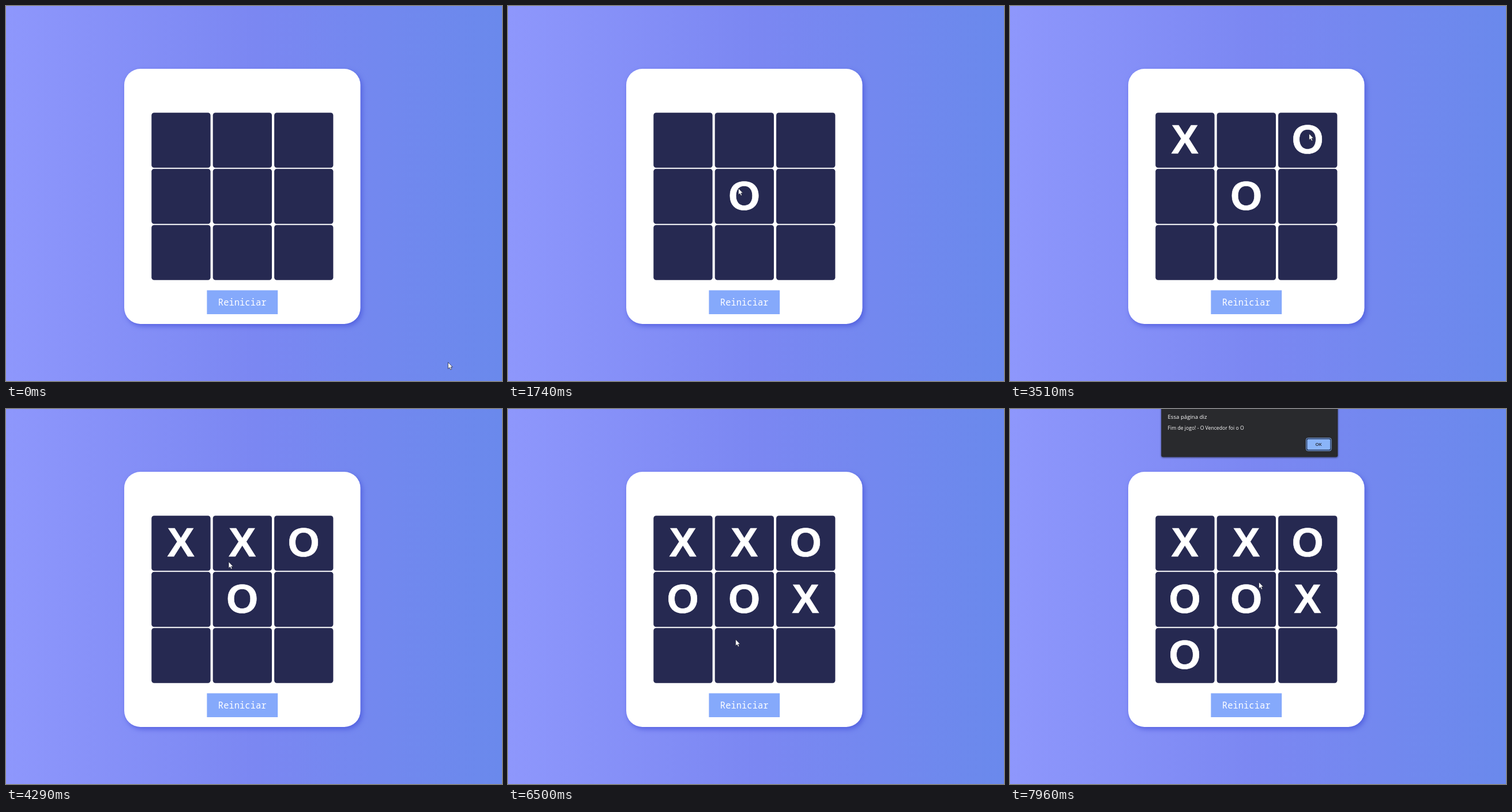
Animation of 860x651 px, one loop 7990 ms. Source, as an HTML page:

```html
<!DOCTYPE html>
<html lang="pt">
<head>
<meta charset="utf-8">
<title>Jogo da velha</title>
<style>
  html, body { margin: 0; width: 100%; height: 100%; overflow: hidden; }
  body { background: linear-gradient(to right, #8e97fc, #7b87f2 50%, #6a89ec); }
  svg { display: block; }
  #card { fill: #fff; filter: drop-shadow(3px 4px 4px #4450d8b0); }
  .cell { fill: #262951; }
  .mark { font: bold 71px "Liberation Sans", Arial, sans-serif; fill: #fff; stroke: #fff; stroke-width: .7; text-anchor: middle; }
  .restart { font: 500 15.5px "Noto Sans Mono", monospace; fill: #fff; text-anchor: middle; }
  #dialog { font-family: "Open Sans", sans-serif; fill: #fff; }
  #dialog .panel { fill: #292a2d; filter: drop-shadow(0 1px 1.5px #0009); }
</style>
</head>
<body>
<svg width="860" height="651" viewBox="0 0 860 651">
  <rect id="card" x="205" y="109" width="409.5" height="443" rx="28"/>
  <g id="board"></g>
  <rect x="348.4" y="493.5" width="122.8" height="41.5" fill="#85a9fb"/>
  <text class="restart" x="409.7" y="520">Reiniciar</text>
  <g id="dialog">
    <rect class="panel" x="262.3" y="-8" width="306" height="91.3" rx="3"/>
    <text x="273.5" y="17" font-size="9.65">Essa página diz</text>
    <text x="273.5" y="36.3" font-size="8.65">Fim de jogo! - O Vencedor foi o O</text>
    <rect x="513.5" y="50.5" width="43.5" height="22" rx="3" fill="#14213d" stroke="#8ab4f8"/>
    <rect x="515.2" y="52.2" width="40.1" height="18.6" rx="2" fill="#8ab4f8"/>
    <text x="535" y="64" font-size="7.8" font-weight="600" text-anchor="middle" fill="#202124">OK</text>
  </g>
  <path id="cursor" d="M.5.6V11.8L3 9.5 4.8 13.3 6.7 12.5 5 8.8H8.4Z" fill="#fff" stroke="#15172b" stroke-width=".7"/>
</svg>
<script>
const LOOP = 7990;
const $ = id => document.getElementById(id);

// Time and cell of each click; the players alternate
const clicks = [[1740, 4], [2610, 0], [3510, 2], [3960, 1], [4770, 3], [5980, 5], [7190, 6]];

// Pointer strokes: departure, arrival, x, y
const strokes = [
  [0, 0, 766, 618],
  [10, 785, 428, 333],
  [835, 990, 399, 316],
  [1980, 2500, 308, 214],
  [2660, 2980, 518, 221],
  [3520, 3880, 414, 230],
  [4080, 4600, 335, 326],
  [5050, 5180, 398, 313],
  [5180, 5810, 503, 355],
  [5980, 6890, 324, 428],
  [7790, 7960, 431, 300]
];

const clamp = u => Math.max(0, Math.min(1, u));
const ease = u => u * u * (3 - 2 * u);
const progress = (t, from, to) => clamp((t - from) / (to - from || 1));

function add(tag, attrs, text = "") {
  const el = document.createElementNS("http://www.w3.org/2000/svg", tag);
  for (const name in attrs) el.setAttribute(name, attrs[name]);
  el.textContent = text;
  return $("board").appendChild(el);
}

const column = i => i % 3 * 106.4;
const row = i => Math.floor(i / 3) * 97.5;

for (let i = 0; i < 9; i++)
  add("rect", { class: "cell", x: 252.3 + column(i), y: 185.2 + row(i), width: 102.3, height: 95.5, rx: 4.5 });

const marks = clicks.map(([time, cell], turn) => ({
  time,
  el: add("text", { class: "mark", x: 303.2 + column(cell), y: 256.2 + row(cell) }, "OX"[turn % 2])
}));

function pointer(t) {
  let [, , x, y] = strokes[0];
  for (const [from, to, nextX, nextY] of strokes) {
    const u = ease(progress(t, from, to));
    x += (nextX - x) * u;
    y += (nextY - y) * u;
  }
  return `translate(${x} ${y})`;
}

function draw(t) {
  for (const { time, el } of marks) el.style.display = t >= time ? "" : "none";
  $("dialog").style.opacity = progress(t, 7345, 7520);
  $("cursor").setAttribute("transform", pointer(t));
}

const start = performance.now();
function frame() {
  draw((performance.now() - start) % LOOP);
  requestAnimationFrame(frame);
}
frame();
</script>
</body>
</html>
```
